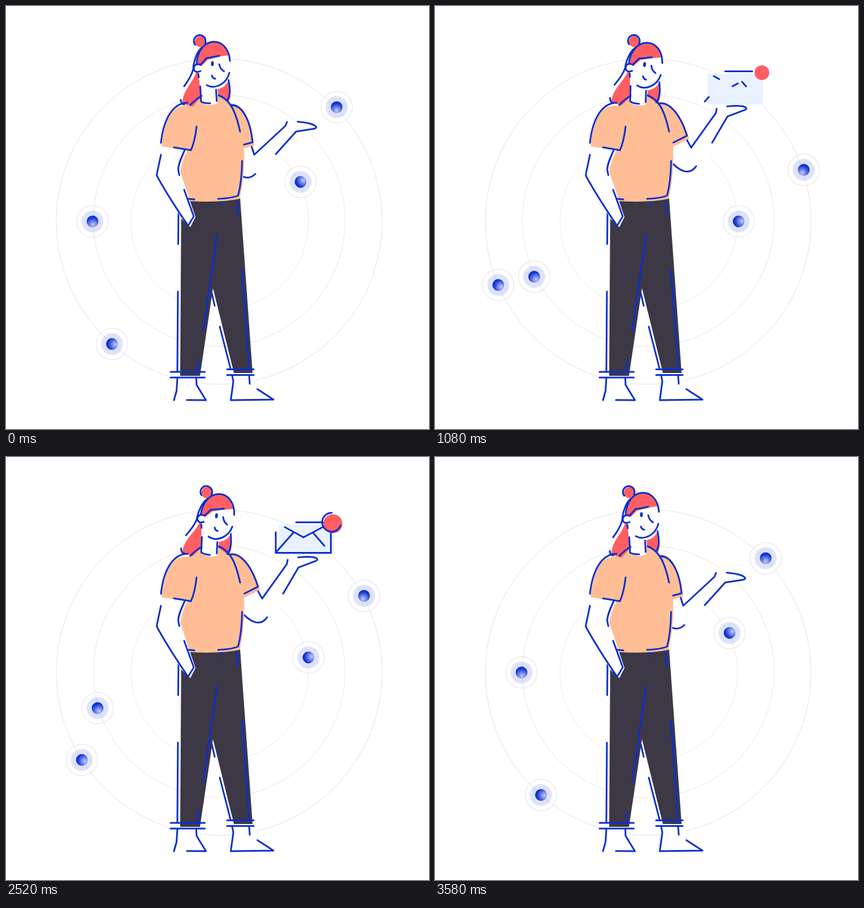
Write an HTML page with a canvas that moves like this. It is 748 px wide and 748 px high and loops after 3600 ms.

```html
<!DOCTYPE html>
<html lang="en">
<head>
<meta charset="utf-8">
<style>
  html, body { margin: 0; height: 100%; overflow: hidden; background: #fff; }
  canvas { display: block; }
</style>
</head>
<body>
<canvas id="stage" width="748" height="748"></canvas>
<script>
const ctx = document.getElementById('stage').getContext('2d');
const LOOP = 3600, DEG = Math.PI / 180;
const BLUE = '#0a2fd0', CORAL = '#ff5f63', PEACH = '#ffbe95', DARK = '#3d3845';

// Eased 0..1, cubic curve with handles (.57, 0) and (.36, 1)
function ease(x) {
  if (x <= 0) return 0;
  if (x >= 1) return 1;
  let lo = 0, hi = 1, u;
  for (let i = 0; i < 24; i++) {
    u = (lo + hi) / 2;
    const v = 1 - u;
    if (1.71 * u * v * v + 1.08 * u * u * v + u * u * u < x) lo = u; else hi = u;
  }
  return u * u * (3 - 2 * u);
}

// Rises during a..b and falls back during c..d
const swing = (t, a, b, c, d) => ease((t - a) / (b - a)) * (1 - ease((t - c) / (d - c)));

function fill(path, color) {
  ctx.fillStyle = color;
  ctx.fill(new Path2D(path));
}

function line(path) {
  ctx.strokeStyle = BLUE;
  ctx.lineWidth = 3;
  ctx.stroke(new Path2D(path));
}

// Draws the first part of a path of the given length
function trimmed(path, length, part) {
  if (part < 0.005) return;
  if (part < 1) ctx.setLineDash([length * part, 999]);
  line(path);
  ctx.setLineDash([]);
}

function disc(x, y, r, color) {
  ctx.beginPath();
  ctx.arc(x, y, r, 0, 7);
  ctx.fillStyle = color;
  ctx.fill();
}

function ring(x, y, r, color) {
  ctx.beginPath();
  ctx.arc(x, y, r, 0, 7);
  ctx.strokeStyle = color;
  ctx.lineWidth = 1;
  ctx.stroke();
}

function turned(x, y, angle, drawPart) {
  ctx.save();
  ctx.translate(x, y);
  ctx.rotate(angle);
  ctx.translate(-x, -y);
  drawPart();
  ctx.restore();
}

function satellite(radius, angle, shine, turn) {
  ctx.save();
  ctx.translate(377, 381);
  ctx.rotate((angle + turn) * DEG);
  ctx.translate(radius, 0);
  ctx.rotate((shine - angle) * DEG);
  ring(0, 0, 27.8, '#e3e3e5');
  disc(0, 0, 19.4, 'rgba(36,66,228,.15)');
  const glow = ctx.createRadialGradient(6, 0, 0, 6, 0, 13);
  glow.addColorStop(0, '#c6cdf9');
  glow.addColorStop(1, '#1032d4');
  disc(0, 0, 10.4, glow);
  ctx.restore();
}

function orbits(t) {
  ring(377, 381, 288, '#e2e2e4');
  ring(377, 379.5, 222.7, '#e7e7e9');
  ring(378, 381, 157, '#ededee');
  const turn = 30 * swing(t, 0, 1615, 1615, 3600);
  satellite(289.8, -44.2, 90, turn);
  satellite(287.9, 131.2, 8, turn);
  satellite(160, -25.9, -30, turn);
  satellite(224, 180, 82, -turn);
}

function legs() {
  fill('M304 655L301 697H354L341 656ZM398 651L399 697H473L434 652Z', '#fff');
  fill('M310 340L308 654H343L366 499 403 649H436L414 340Z', DARK);
  line('M305 366L304.5 421M304 505L303 645M373 406L349 575M341 626L338 645');
  line('M364 508L369 530M378 567L397 641M417.5 467L430 640M408.5 345L410 370M380 347V352');
  for (const y of [642.5, 652.5]) line(`M391 ${y}h47M291 ${y + 4.5}h60.5`);
  line('M303 659L301.5 681 297 697M336.5 659L337 670 353.5 697 320 696.8');
  line('M400 654L402 664 397.5 697 473 696 444.5 677.5M430 654L431 668');
}

// Swings as one piece about the shoulder; the shirt covers its inner ends
function raisedArm() {
  fill('M405 250L436 247 440 262 497 212 516 204 549 214 516 223 448 300 430 306 402 285Z', '#fff');
  fill('M392 172C420 170 434 200 439 247L405 256Z', PEACH);
  line('M392 177C415 168 432 200 436 241L410 248M434.5 249L439 263 494 212 497 205');
  line('M516 204.5Q540 207 546 211.5 551.5 215 545 217L513 222 477 262');
  line('M402 285C412 300 426 311 441 297');
}

function shirt() {
  fill('M327 176L345 160 376 158Q390 164 397 173L421 250Q423 300 413 341 380 348 325 345' +
    'L308 293Q312 270 321 255L275 248C281 200 292 176 320 176Z', PEACH);
}

function restingArm() {
  fill('M275 250L321 255Q312 270 308 293L335 373 326 391 310 376 270 305 267 298Z', '#fff');
  line('M274 263L267 296Q266 300 268.5 303.5 290 342 322 388.5L332 372 315 325');
  line('M316 255C309 270 303 284 305 292L306.5 299');
}

function head() {
  fill('M338 112C331 137 312 148 312 173L330 178 346 160 344 120Z' +
    'M394 130C390 142 380 146 374 147L375 158 394 169C399 160 398 145 394 130Z', CORAL);
  fill('M341 100L394 87C399 120 388 143 374 145V172Q360 178 346 172L340 118Z', '#fff');
  disc(344, 63, 10, CORAL);
  fill('M337 106C338 50 389 55 395 87Q375 89 357 95L346 106Z', CORAL);
  const ear = 'M344 104C328 98 328 123 344 115';
  fill(ear, '#fff');
  line(ear + 'M340 120L341 126');
  line('M334.6 68.5A10.4 10.4 0 1 1 352.2 66');
  line('M315 142Q328 124 331 112C332 95 339 79 346 74');
  line('M337 103C339 52 393 50 396 97M344 104L354.5 92Q365 91 377 88');
  line('M377 103Q379 112 385.5 115.5M364 123Q365.5 128 370 128.5M355 140C370 148 390 138 395 118');
  line('M393.5 131C396 143 398 158 391 167M309 166Q310 174 315 174');
  line('M343.5 142L345 169Q350 172.5 361 172M371.5 148L372.5 168');
  ctx.beginPath();
  ctx.ellipse(365, 102, 2.5, 4.4, 0, 0, 7);
  ctx.fillStyle = BLUE;
  ctx.fill();
}

function shirtLines() {
  line('M274 242C278 205 292 172 321 171M297 250L327 255Q334 240 337 213');
  line('M376 158C400 167 408 195 414 222M326 175Q336 164 346 159');
  line('M417.5 274Q417 310 410.5 335 400 340 375 341M323 341L333 342');
}

function envelope(t) {
  ctx.globalAlpha = swing(t, 550, 960, 2980, 3340);
  fill('M482 120h98v54h-98Z', '#eaf2ff');
  ctx.globalAlpha = 1;
  trimmed('M513 115.5h48', 48, swing(t, 800, 1080, 2960, 3260));
  const flap = swing(t, 940, 1340, 2920, 3220);
  for (const path of ['M493 124l33 18', 'M526 142l34 -18', 'M477 169l31 -35', 'M543 134l20 23']) {
    trimmed(path, 40, flap * 1.2);
  }
  trimmed('M477 133v36.5h97.5v-35', 169, swing(t, 1080, 1500, 2880, 3200));
  disc(578, 118, 16.8 * swing(t, 840, 1240, 2940, 3240), CORAL);
  trimmed('M576 98.7A16.7 16.7 0 1 0 591.5 121', 75, swing(t, 1120, 1560, 2860, 3120));
}

function draw(t) {
  ctx.fillStyle = '#fff';
  ctx.fillRect(0, 0, 748, 748);
  ctx.lineCap = ctx.lineJoin = 'round';
  orbits(t);
  legs();
  turned(384, 188, -0.203 * swing(t, 100, 1080, 2960, 3570), raisedArm);
  shirt();
  restingArm();
  turned(350, 170, 0.107 * swing(t, 560, 1420, 2980, 3600), head);
  shirtLines();
  envelope(t);
}

const start = performance.now();
(function frame() {
  draw((performance.now() - start) % LOOP);
  requestAnimationFrame(frame);
})();
</script>
</body>
</html>
```
